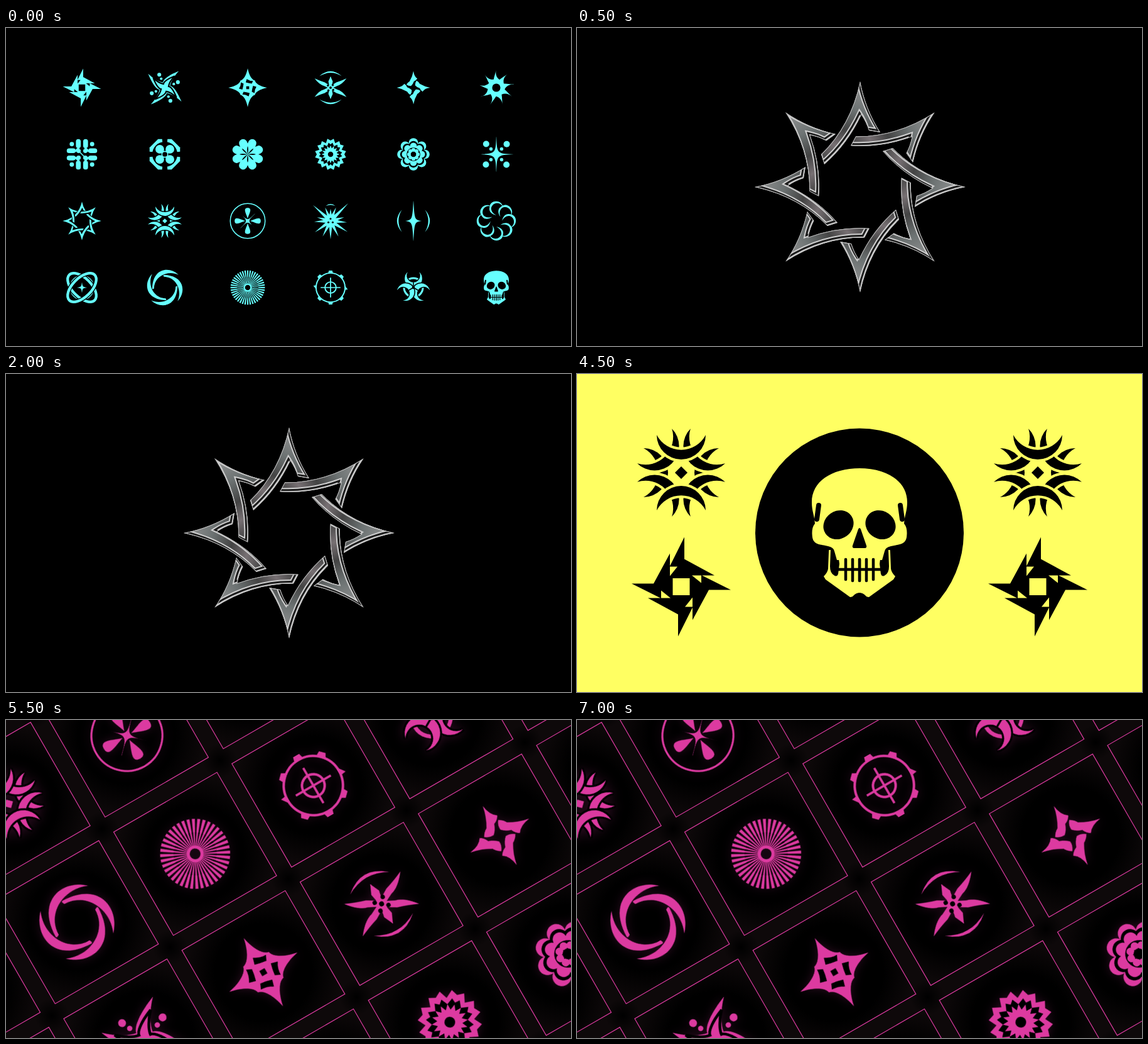
Write an HTML page that moves like this. It is 900 px wide and 506 px high and loops after 8 s.

```html
<!DOCTYPE html>
<html lang="en">
<head>
<meta charset="utf-8">
<title>Icon set</title>
<style>
  html, body { margin: 0; width: 100%; height: 100%; overflow: hidden; background: #000; }
  svg { display: block; width: 100%; height: 100%; fill: currentColor; }
  .hole { fill: var(--bg); }
  .line { fill: none; stroke: currentColor; }
  .cut { fill: none; stroke: var(--bg); }
  .edge { stroke: var(--bg); stroke-width: 8; paint-order: stroke; }
  .round { stroke-linecap: round; }
  .glow { filter: drop-shadow(0 0 8px #dc3aa033); }
</style>
</head>
<body>
<svg id="stage" viewBox="0 0 900 506"></svg>
<script>
const path = (d, cls = '', width = '') => `<path d="${d}" class="${cls}" ${width && `stroke-width="${width}"`}/>`;
const dot = (x, y, r, cls = '') => `<circle cx="${x}" cy="${y}" r="${r}" class="${cls}"/>`;
const circle = (r, width, cls = 'line') => `<circle r="${r}" class="${cls}" stroke-width="${width}"/>`;
const group = (transform, body) => `<g transform="${transform}">${body}</g>`;
const turn = (angles, body) => angles.map(a => group(`rotate(${a})`, body)).join('');
const spin = (n, body, from = 0) => turn(Array.from({ length: n }, (_, i) => from + i * 360 / n), body);
const mirror = body => body + group('scale(-1 1)', body);

// Closed outline made of one sector's points repeated n times around the centre.
function ring(n, sector, cmd = 'L') {
  const v = sector.split(' ').map(Number), pts = [];
  for (let i = 0; i < n; i++) {
    const c = Math.cos(i * 2 * Math.PI / n), s = Math.sin(i * 2 * Math.PI / n);
    for (let j = 0; j < v.length; j += 2)
      pts.push(`${(v[j] * c - v[j + 1] * s).toFixed(2)} ${(v[j] * s + v[j + 1] * c).toFixed(2)}`);
  }
  return `M${pts[pts.length - 1]}${cmd}${pts.join(' ')}Z`;
}

// Four-pointed star with half height a, half width b; k sets how full the waist is.
const sparkle = (a, b, k) => mirror(path(
  `M-.3 ${-a}H0C${k} ${-k} ${k} ${-k} ${b} 0C${k} ${k} ${k} ${k} 0 ${a}H-.3Z`));

const STAR_POINT = 'M0-168Q8-125 32-87L14-90Q10-103 2-115Q-20-68-57-36L-62-52Q-15-98 0-168Z';
const CRESCENT = path('M-39-60A39 39 0 0 0 39-60A44 44 0 0 1-39-60Z', 'edge');
const ARC = path('M-46-48Q0-88 46-48Q0-75-46-48Z');
const CURVED_X = ring(4, '36 -46 24 -22 22 -8 36 -6 54 20 69 58', 'C');
const ORBIT = '<ellipse rx="74" ry="39" class="cut" stroke-width="18"/>'
  + '<ellipse rx="74" ry="39" class="line" stroke-width="11"/>';

const skull = group('scale(.683)',
  mirror(path('M-1 20H45Q49 25 49 32L50 58Q51 64 57 70L54 75 15 103Q11 103 9 100Q5 96-1 96Z')
    + path('M36 22H60V28H46L47 54Q47 64 41 68Q36 72 34 66L32 50Z', 'hole')
    + path('M-1-102C46-102 76-80 76-48C76-34 72-28 71-14C76-8 76 0 75 8C73 20 62 19 50 22Q41 24 40 30L36 44H-1Z')
    + path('M65-43L68-21', 'cut round', 8)
    + '<ellipse cx="33.5" cy="-12" rx="25" ry="22" class="hole" transform="rotate(35 33.5 -12)"/>'
    + path('M0 59H36M0 43V77M11 43V77M22 43V75', 'cut round', 4.5))
  + path('M-2-5Q0-9 2-5L11 21Q12 25 8 25H-8Q-12 25-11 21Z', 'hole'));

const icons = [
  path(ring(4, '5 -79 5 -44 53 -18 33 -18')) + path('M-13.5-13.5h27v27h-27z', 'hole')
    + spin(4, path('M32-18V-6L17-18Z', 'hole')),
  path(CURVED_X) + group('scale(.7)', path(CURVED_X, 'cut', 8))
    + spin(4, dot(-23, -54, 8) + dot(-15, -37, 5.5)),
  path(ring(4, '6 -50 18 -32 30 -30 32 -18 50 -6 80 0', 'C'))
    + spin(4, path('M-4-36Q8-28 22-28L17-17Q6-18-8-22Z', 'hole')) + path('M-6-6H6V6H-6Z', 'hole'),
  ARC + group('scale(1 -1)', ARC)
    + mirror(path('M-1-44L0-46 9-26 6-11 24-22Q44-28 66-38Q46-12 28-8L12 0 28 8Q46 12 66 38Q44 28 24 22L6 11 9 26 0 46-1 44Z'))
    + dot(0, 0, 5, 'hole') + spin(4, dot(11, 9, 4.5, 'hole')),
  spin(4, path('M0-69Q3-46 16-38Q12-30 2-26Q-2-14-10-7Q-20-6-29-13Q-24-22-16-26Q-4-46 0-69Z')),
  path(ring(9, '-5 -58 0 -42 13 -33 26 -43 40 -51 48.2 -57.5', 'C')) + dot(0, 0, 17, 'hole'),

  spin(4, path('M-15-53V-36M15-53V-36', 'line round', 20) + dot(42, -42, 9) + dot(14, -14, 9)
    + path('M12-28L28-12', 'line', 8)) + path('M-9-9L9 9', 'line', 4),
  path('M-28-63H28L63-28V28L28 63H-28L-63 28V-28Z') + dot(0, 0, 52, 'hole')
    + spin(4, path('M-12-70H12L9-44H-9Z', 'hole')) + spin(4, dot(21, -21, 18))
    + path('M-14-14H14V14H-14Z') + dot(0, 0, 10, 'hole'),
  spin(4, path('M0 0L-19-46M0 0L19-46', 'line round', 34))
    + spin(8, path('M0 0Q5-24 0-34Q-5-24 0 0Z', 'hole')),
  path(ring(8, '-13 -64 0 -57 13 -64 19 -46')) + path(ring(8, '-8 -48 0 -41 8 -48 14 -34'), 'hole')
    + path(ring(16, '0 -37 5 -25')) + dot(0, 0, 11, 'hole'),
  spin(8, dot(0, -48, 19)) + spin(8, dot(0, -36, 19, 'hole')) + spin(8, dot(0, -34, 14))
    + dot(0, 0, 28, 'hole') + spin(8, dot(0, -18, 8)) + dot(0, 0, 11, 'hole'),
  sparkle(72, 72, 3) + spin(4, dot(43, -42, 13) + dot(22, -22, 7)),

  group('scale(.476)', spin(8, path(STAR_POINT))),
  spin(2, CRESCENT, 90) + spin(4, CRESCENT, 45) + spin(2, CRESCENT) + path('M0-10L10 0 0 10-10 0Z'),
  circle(72, 4) + spin(4, path('M0-10C5-28 22-54 0-54S-5-28 0-10Z'))
    + group('rotate(45)', sparkle(42, 42, 0)),
  [[45, 103], [22, 60], [0, 50], [-22, 60], [-48, 98], [-75, 58], [75, 58], [95, 68], [-93, 68],
    [123, 84], [-126, 80], [153, 72], [-153, 72], [180, 76]]
    .map(([a, len]) => group(`rotate(${a})`, path(`M-8-10L0 ${-len} 8-10Z`))).join('')
    + dot(0, 0, 20) + path('M-20-62Q0-78 20-62Q0-71-20-62Z')
    + dot(0, -9, 4, 'hole') + dot(-9, 6, 4, 'hole') + dot(9, 6, 4, 'hole'),
  sparkle(82, 34, 5) + group('rotate(90)', ARC) + group('rotate(-90)', ARC),
  spin(8, path('M-28-56C-26-90 24-88 27-58C17-80-15-78-21-54C-22-42-14-30 0-24C-20-27-32-40-28-56Z')),

  circle(48, 6) + turn([45, -45], ORBIT) + sparkle(21, 21, 3),
  group('rotate(30) scale(1.274)',
    spin(4, path('M18-58C-22-68-66-36-34 23Q-32 26-29 20C-48-14-22-54 18-58Z'))),
  spin(40, path('M-.8-12L-1.6-44H1.6L.8-12ZM-2-44L-3.1-71H3.1L2-44Z')) + circle(14, 6),
  circle(60, 5) + spin(2, turn([-45, 0, 45], path('M-10-59L-7-70H7L10-59Z'))
    + turn([90], path('M-10-58L8-71 10-58Z')))
    + circle(23, 5) + path('M0-41V41M-41 0H41', 'line', 4.5),
  circle(39, 8) + spin(3, path('M-24-64A36 36 0 1 0 24-64A28 28 0 1 1-24-64Z', 'edge'))
    + spin(3, path('M0-4V-22', 'cut', 4)) + dot(0, 0, 6, 'hole'),
  skull
];
const icon = (i, x, y, scale) => group(`translate(${x} ${y}) scale(${scale})`, icons[i]);
const scene = (color, bg, body) => `<g class="scene" style="color:${color};--bg:${bg}">${body}</g>`;

const sheet = icons.map((_, i) => icon(i, 121 + i % 6 * 132, 95 + Math.floor(i / 6) * 106, .385)).join('');

// Each metal piece is lit from the lower right, whatever its rotation.
const metalPoint = a => group(`rotate(${a})`, `<g clip-path="url(#point)">
  <path d="${STAR_POINT}" fill="#ececec"/>
  <g transform="rotate(${-a}) translate(-3 -3) rotate(${a})">
    <path d="${STAR_POINT}" fill="url(#steel)" stroke="#d0d0d0" stroke-width="7"/>
    <path d="${STAR_POINT}" fill="none" stroke="#1c1c1c" stroke-width="3"/>
  </g>
  <path d="${STAR_POINT}" fill="none" stroke="#bbb" stroke-width="2"/></g>`);
const chrome = `<defs>
  <clipPath id="point"><path d="${STAR_POINT}"/></clipPath>
  <linearGradient id="steel" gradientUnits="userSpaceOnUse" x1="0" y1="-168" x2="-40" y2="-36">
    <stop stop-color="#999"/><stop offset=".35" stop-color="#6c7272"/>
    <stop offset=".6" stop-color="#444"/><stop offset=".8" stop-color="#777073"/><stop offset="1" stop-color="#444"/>
  </linearGradient></defs>`
  + group('translate(451 253)', [0, 45, 90, 135, 180, 225, 270, 315].map(metalPoint).join(''));

const badges = '<rect width="900" height="506" fill="#ffff62"/>'
  + [166, 734].map(x => icon(13, x, 157, 1) + icon(0, x, 338.5, 1)).join('')
  + dot(450, 252.5, 166) + `<g style="color:#ffff62;--bg:#000">${icon(23, 450, 252, 1 / .683)}</g>`;

// Cards on a square grid turned by 30 degrees; icon rows wrap around.
const PITCH = 217.4;
let cards = '';
for (let row = -2; row <= 2; row++)
  for (let col = 0; col < 6; col++)
    cards += group(`translate(${(col - 2) * PITCH} ${row * PITCH})`,
      '<circle cx="108.7" cy="108.7" r="28" fill="url(#spot)"/>'
      + '<rect x="-95" y="-95" width="190" height="190" fill="url(#shade)" stroke="#dc3aa0" stroke-width="1.2"/>'
      + `<g class="glow">${icon((row + 3) % 4 * 6 + col, 0, 0, .785)}</g>`);
const wall = `<defs>
  <radialGradient id="shade" r=".68"><stop offset=".6"/><stop offset="1" stop-color="#0e090a"/></radialGradient>
  <radialGradient id="spot"><stop/><stop offset="1" stop-opacity="0"/></radialGradient>
  </defs><rect width="900" height="506" fill="#0e090a"/>`
  + group('translate(301.3 213) rotate(-30)', cards);

const stage = document.getElementById('stage');
stage.innerHTML = scene('#66ffff', '#000', sheet) + scene('#ccc', '#000', chrome)
  + scene('#000', '#ffff62', badges) + scene('#dc3aa0', '#000', wall);

const scenes = stage.querySelectorAll('.scene');
const starts = [0, 500, 3000, 5500];
const LOOP = 8000;
const origin = performance.now();
function draw() {
  const t = (performance.now() - origin) % LOOP;
  const current = starts.filter(s => s <= t).length - 1;
  scenes.forEach((s, i) => s.style.display = i === current ? '' : 'none');
  requestAnimationFrame(draw);
}
draw();
</script>
</body>
</html>
```
